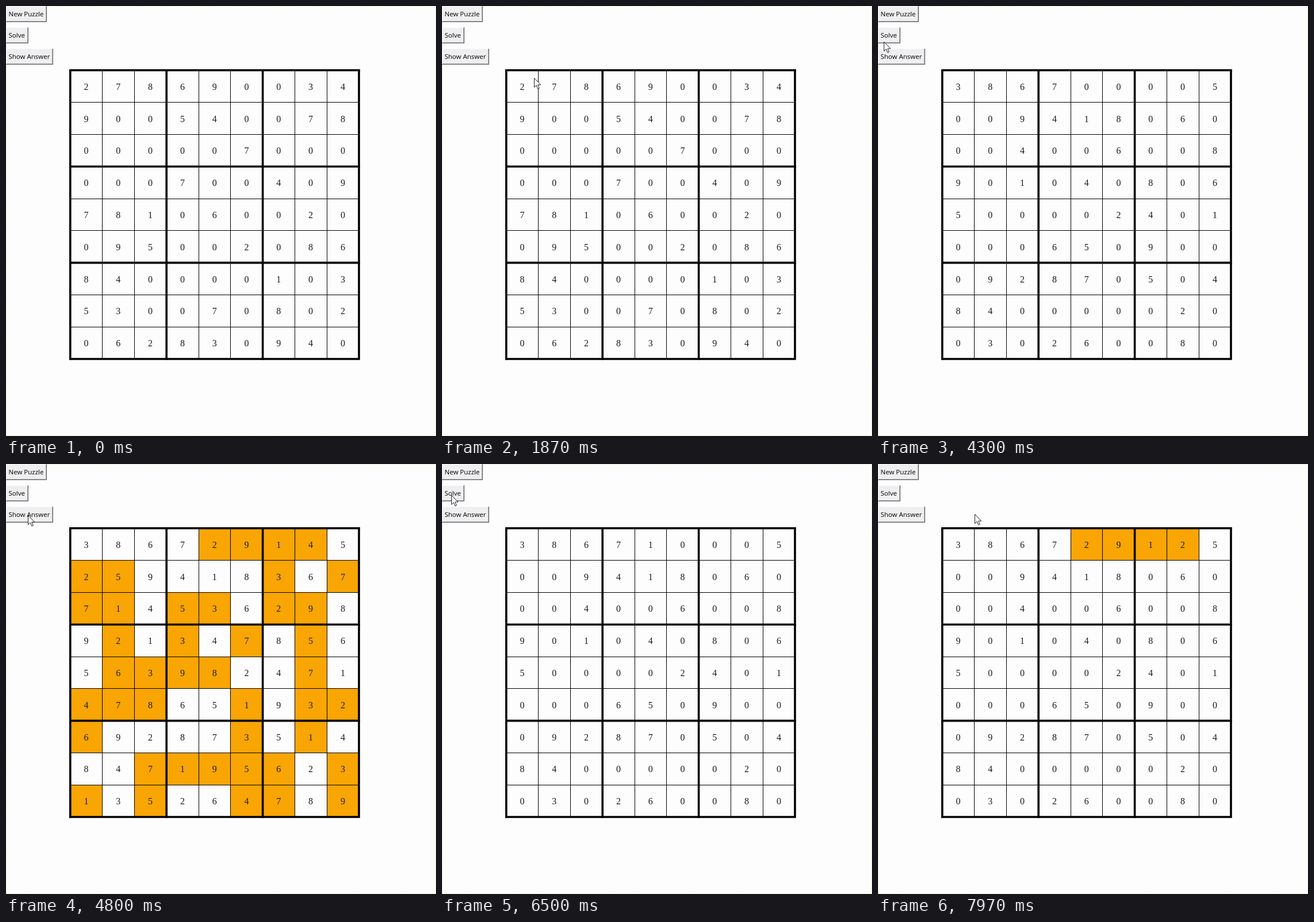
An HTML page for the animation above (8 s loop, 748 by 748 pixels).

```html
<!DOCTYPE html>
<html lang="en">
<head>
<meta charset="utf-8">
<title>Number grid solver</title>
<style>
html, body { margin: 0; width: 100%; height: 100%; overflow: hidden; background: #fdfdfd; }
svg { display: block; width: 100vw; height: 100vh; }
.digit { font: 16px "Liberation Serif", "Noto Serif", serif; text-anchor: middle; fill: #1c1c1c; }
.label { font: 11.5px "Open Sans", "Noto Sans", sans-serif; fill: #000; }
</style>
</head>
<body>
<svg id="stage" viewBox="0 0 748 748"></svg>
<script>
const LOOP = 8000, ORIGIN = 111.8, CELL = 55.8;
const ORANGE = '#f9a503', PAPER = '#fdfdfd';

const first = '278690034900540078000007000000700409781060020095002086840000103530070802062830940';
const second = '386700005009418060004006008901040806500002401000650900092870504840000020030260080';
const answer = '386729145259418367714536298921347856563982471478651932692873514847195623135264789';
const reverse = s => [...s].reverse().join('');

// board shown from each time on
const boards = [
  [0, first], [2520, reverse(first)], [2720, reverse(second)],
  [3120, second], [4770, answer], [6430, second]
];

// pressed intervals: button index, start, end
const presses = [[0, 2430, 2520], [0, 2620, 2720], [0, 3030, 3120], [2, 4700, 4770], [1, 6370, 6430]];

// pointer stops: time, x, y
const path = [
  [0, 762, 604], [540, 762, 604], [1060, 298, 236], [1530, 298, 236], [1600, 167, 132],
  [1770, 167, 132], [1870, 160, 125], [2380, 48, 8], [3400, 48, 8], [3830, 26, 38],
  [4250, 8, 60], [4620, 38, 89], [5700, 38, 89], [6300, 16, 54], [7300, 16, 54],
  [7900, 168, 87], [LOOP, 168, 87]
];

// the solver counts up in each empty cell: cell, last digit tried
const SOLVE_START = 6440, STEP = 110, FILL_DELAY = 80;
const tries = [];
for (const [cell, last] of [[4, 2], [5, 9], [6, 1], [7, 2]])
  for (let d = 1; d <= last; d++)
    tries.push({ cell, digit: d, time: SOLVE_START + tries.length * STEP });

const stage = document.getElementById('stage');
function add(tag, attrs, parent = stage) {
  const el = document.createElementNS('http://www.w3.org/2000/svg', tag);
  for (const k in attrs) el.setAttribute(k, attrs[k]);
  return parent.appendChild(el);
}

add('rect', { width: 748, height: 748, fill: PAPER });
add('rect', { x: .5, y: .5, width: 747, height: 747, fill: 'none', stroke: '#e9e9f6' });
add('rect', { x: .5, y: .5, width: 747, height: 747, fill: 'none', stroke: '#f5f5c8', 'stroke-dasharray': '3 3' });

const cells = Array.from({ length: 81 }, (_, i) => {
  const x = ORIGIN + i % 9 * CELL, y = ORIGIN + Math.floor(i / 9) * CELL;
  return {
    box: add('rect', { x, y, width: CELL, height: CELL, fill: PAPER }),
    text: add('text', { class: 'digit', x: x + 27.7, y: y + 33.9 })
  };
});

const END = ORIGIN + 9 * CELL;
for (const thick of [false, true])
  for (let i = 0; i <= 9; i++) {
    if ((i % 3 === 0) !== thick) continue;
    const w = thick ? 3.6 : 1, over = thick ? 1.8 : 0;
    const p = thick ? ORIGIN + i * CELL : Math.floor(ORIGIN + i * CELL) + .5;
    add('path', {
      d: `M${p} ${ORIGIN - over}V${END + over}M${ORIGIN - over} ${p}H${END + over}`,
      stroke: '#000', 'stroke-width': w
    });
  }

const buttons = [['New Puzzle', 0, 71], ['Solve', 37, 39], ['Show Answer', 74, 82]].map(([name, y, w]) => {
  const g = add('g', { transform: `translate(0 ${y})` });
  add('rect', { width: w, height: 28, fill: '#efeff1' }, g);
  const light = add('path', { d: `M0 .5H${w}M.5 0V28`, fill: 'none' }, g);
  const mid = add('path', { d: `M1 26.5H${w - 1}M${w - 1.5} 1V27`, fill: 'none' }, g);
  const dark = add('path', { d: `M0 27.5H${w}M${w - .5} 0V28`, fill: 'none' }, g);
  const label = add('text', { class: 'label' }, g);
  label.textContent = name;
  return { light, mid, dark, label };
});

const pointer = add('path', {
  d: 'M.5 .5V16.5L4.2 13L6.8 19L9.3 18L6.7 12.1H11.8Z',
  fill: '#fff', stroke: '#222', 'stroke-width': 1
});

function pointerAt(t) {
  const i = path.findIndex(p => p[0] > t);
  const [t0, x0, y0] = path[i - 1], [t1, x1, y1] = path[i];
  const u = (t - t0) / (t1 - t0), e = u * u * (3 - 2 * u);
  return [x0 + (x1 - x0) * e, y0 + (y1 - y0) * e];
}

function drawBoard(t) {
  const board = [...boards.filter(b => b[0] <= t).pop()[1]];
  const filled = new Set();
  if (board.join('') === answer)
    board.forEach((_, i) => second[i] === '0' && filled.add(i));
  for (const { cell, digit, time } of tries) {
    if (time > t) break;
    board[cell] = String(digit);
    if (t - time >= FILL_DELAY) filled.add(cell);
  }
  cells.forEach(({ box, text }, i) => {
    box.setAttribute('fill', filled.has(i) ? ORANGE : PAPER);
    if (text.textContent !== board[i]) text.textContent = board[i];
  });
}

function drawButtons(t) {
  buttons.forEach(({ light, mid, dark, label }, i) => {
    const down = presses.some(([b, from, to]) => b === i && t >= from && t < to);
    light.setAttribute('stroke', down ? '#696969' : '#fbfbfb');
    mid.setAttribute('stroke', down ? '#e3e3e3' : '#a5a5a5');
    dark.setAttribute('stroke', down ? '#fff' : '#696969');
    label.setAttribute('x', down ? 5.5 : 4.5);
    label.setAttribute('y', down ? 19 : 18);
  });
}

function draw(t) {
  drawBoard(t);
  drawButtons(t);
  pointer.setAttribute('transform', `translate(${pointerAt(t).map(Math.round)})`);
}

const start = performance.now();
function tick() {
  draw((performance.now() - start) % LOOP);
  requestAnimationFrame(tick);
}
tick();
</script>
</body>
</html>
```
